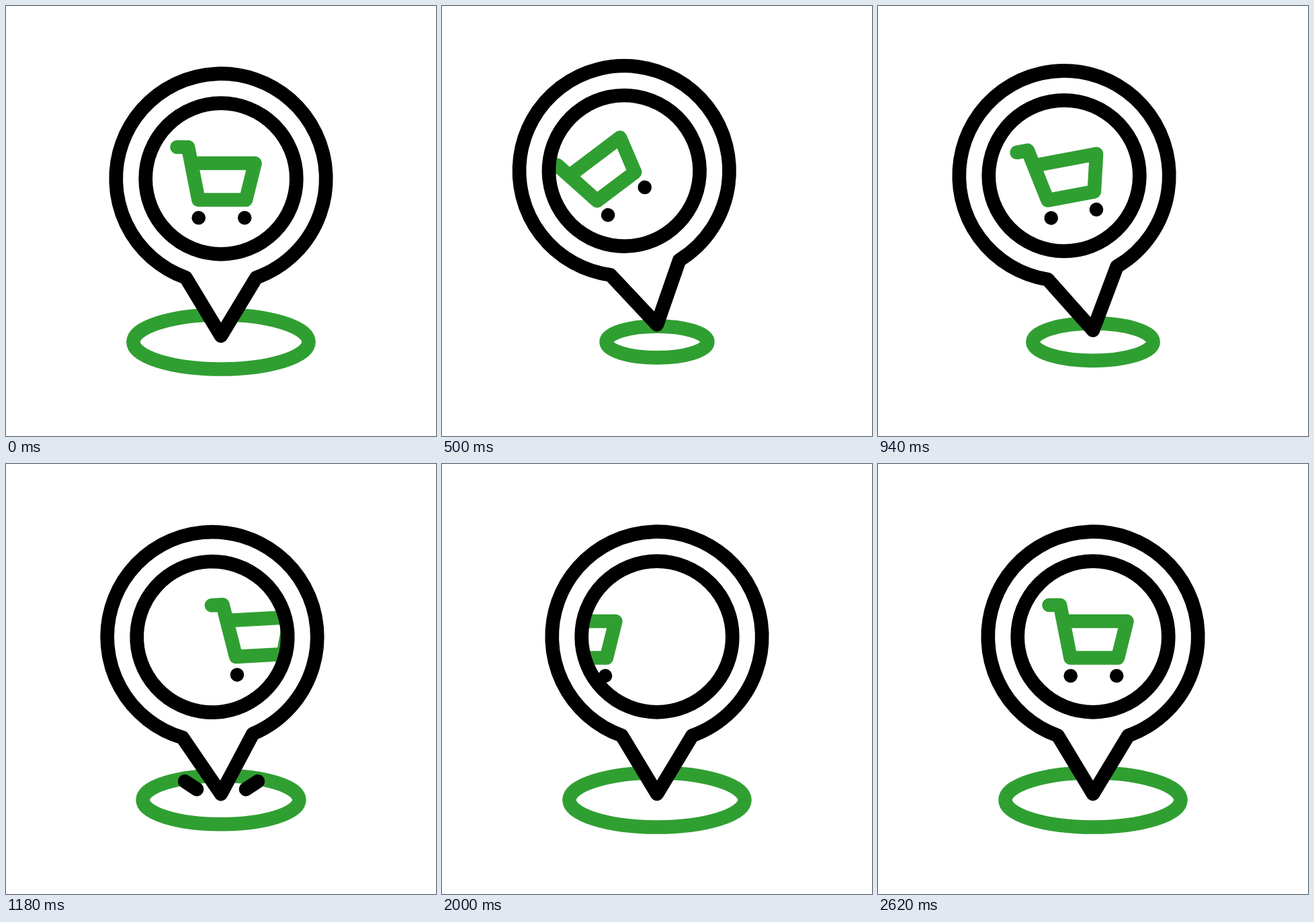
An HTML page with a canvas for the animation above (3600 ms loop, 640x640 px).

```html
<!DOCTYPE html>
<html lang="en">
<head>
<meta charset="utf-8">
<title>Shop location pin</title>
<style>
  html, body { margin: 0; height: 100%; overflow: hidden; background: #fff; }
  canvas { display: block; }
</style>
</head>
<body>
<canvas id="stage" width="640" height="640"></canvas>
<script>
const ctx = document.getElementById('stage').getContext('2d');
const LOOP = 3600, GREEN = '#309f32', BLACK = '#000', TAU = Math.PI * 2;
const rad = deg => deg * Math.PI / 180;

// Keyframes as [ms, value]
const tilt = [[0, 0], [840, -18.7], [1090, 4], [1188, -3.3], [1290, 1.6], [1390, -0.6], [1480, 0]];
const lift = [[0, 0], [180, 0.3], [320, 3.4], [540, 20.5], [680, 37], [790, 40], [940, 8.5], [1010, 0]];
const ring = [[0, 1], [320, 0.818], [680, 0.348], [820, 0.28], [940, 0.683], [1088, 1.12],
              [1186, 0.89], [1290, 1.05], [1390, 0.98], [1480, 1]];
const wheelie = [[0, 0], [340, -25], [620, -25], [950, 0]];
const driveOut = [[890, 0], [1580, 175]];
const driveIn = [[1580, -175], [2620, 0]];
const sparkHead = [[1100, 36.5], [1260, 71.5]];
const sparkTail = [[1180, 36.5], [1340, 71.5]];

// Monotone cubic interpolation: flat at extremes and ends
function sample(keys, t) {
  const last = keys.length - 1;
  if (t <= keys[0][0]) return keys[0][1];
  if (t >= keys[last][0]) return keys[last][1];
  const i = keys.findIndex(k => k[0] > t) - 1;
  const slope = j => (keys[j + 1][1] - keys[j][1]) / (keys[j + 1][0] - keys[j][0]);
  const tangent = j => {
    if (j === 0 || j === last) return 0;
    const a = slope(j - 1), b = slope(j);
    return a * b > 0 ? 2 * a * b / (a + b) : 0;
  };
  const [t0, v0] = keys[i], [t1, v1] = keys[i + 1];
  const span = t1 - t0, u = (t - t0) / span, w = 1 - u;
  return v0 * w * w * (1 + 2 * u) + v1 * u * u * (3 - 2 * u)
       + span * u * w * (tangent(i) * w - tangent(i + 1) * u);
}

function line(color, points, closed) {
  ctx.beginPath();
  points.forEach(([x, y]) => ctx.lineTo(x, y));
  if (closed) ctx.closePath();
  ctx.strokeStyle = color;
  ctx.stroke();
}

function circle(x, y, r) {
  ctx.beginPath();
  ctx.arc(x, y, r, 0, TAU);
}

function drawRing(scale) {
  ctx.beginPath();
  ctx.ellipse(320, 500, 130.5 * scale, 40.5 * scale, 0, 0, TAU);
  ctx.strokeStyle = GREEN;
  ctx.stroke();
}

// Origin is the centre of the pin head
function drawCart(t) {
  ctx.save();
  circle(0, 0, 112);
  ctx.clip();
  ctx.translate(sample(t < 1580 ? driveOut : driveIn, t) - 33, 68);
  ctx.rotate(rad(sample(wheelie, t)));
  ctx.translate(33, -68);
  line(GREEN, [[-65.5, -47], [-49, -47], [-33.5, 31.5], [37, 31.5], [50.5, -23], [-44, -23]]);
  ctx.fillStyle = BLACK;
  for (const x of [-33.3, 35.2]) {
    circle(x, 58.3, 10.3);
    ctx.fill();
  }
  ctx.restore();
}

function drawPin(t) {
  ctx.save();
  ctx.translate(320, 491 - sample(lift, t));
  ctx.rotate(rad(sample(tilt, t)));
  ctx.translate(0, -234);
  ctx.beginPath();
  ctx.arc(0, 0, 156.3, rad(109.6), rad(70.4));
  ctx.lineTo(0, 234);
  ctx.closePath();
  ctx.fillStyle = '#fff';
  ctx.fill();
  ctx.strokeStyle = BLACK;
  ctx.stroke();
  drawCart(t);
  circle(0, 0, 112.3);
  ctx.strokeStyle = BLACK;
  ctx.stroke();
  ctx.restore();
}

function drawSparks(t) {
  const head = sample(sparkHead, t), tail = sample(sparkTail, t);
  if (head - tail < 0.1) return;
  for (const side of [-1, 1])
    line(BLACK, [tail, head].map(d => [320.5 + side * d, 508 - 0.657 * d]));
}

function frame(now) {
  const t = now % LOOP;
  ctx.fillStyle = '#fff';
  ctx.fillRect(0, 0, 640, 640);
  ctx.lineWidth = 20.7;
  ctx.lineCap = ctx.lineJoin = 'round';
  drawRing(sample(ring, t));
  drawPin(t);
  drawSparks(t);
  requestAnimationFrame(frame);
}
requestAnimationFrame(frame);
</script>
</body>
</html>
```
